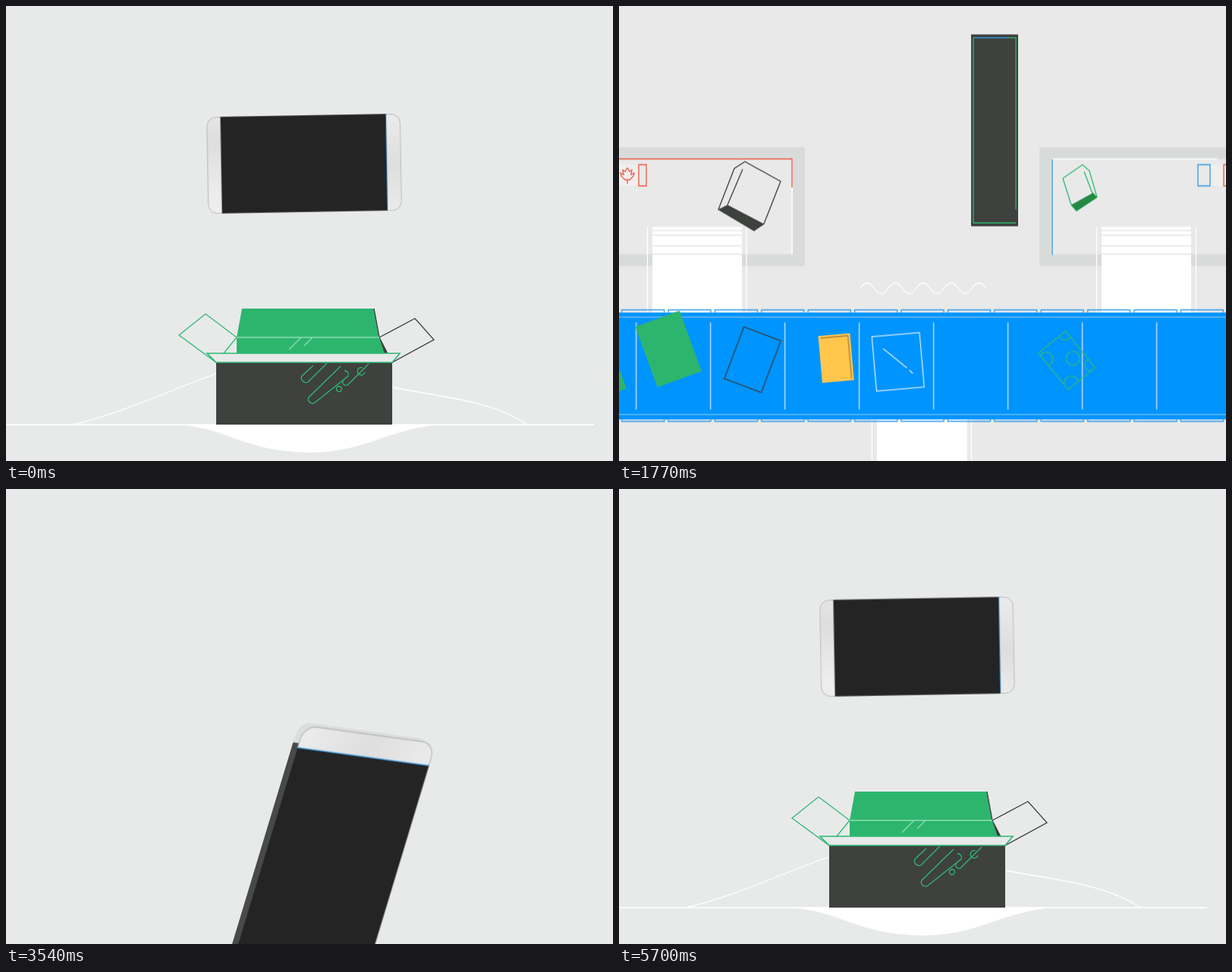
An HTML page that plays this animation: 800 px wide and 600 px high, repeating every 5730 ms.

```html
<!DOCTYPE html>
<html lang="en">
<head>
<meta charset="utf-8">
<title>Phone delivery</title>
<style>
html, body { margin: 0; width: 100%; height: 100%; overflow: hidden; background: #e8eaea; }
svg { display: block; width: 100%; height: 100%; }
.line { fill: none; stroke-width: 1.3; }
.white { stroke: #fff; }
.green { stroke: #2fb873; }
.dark { stroke: #3b3d3c; }
.blue { stroke: #2e9bea; }
.red { stroke: #f0563d; }
.leaf { fill: #2db56d; }
.coal { fill: #3e413e; }
.skin { fill: #ff9a7d; }
.finger { fill: #ffa283; }
.wall { fill: none; stroke: #d8dbda; stroke-width: 15.5; }
</style>
</head>
<body>
<svg viewBox="0 0 800 600" preserveAspectRatio="none">
  <defs>
    <linearGradient id="metal" x2="1" y2=".3">
      <stop stop-color="#ececec"/><stop offset=".5" stop-color="#dedede"/><stop offset="1" stop-color="#ededed"/>
    </linearGradient>
    <pattern id="grille" width="3" height="3" patternUnits="userSpaceOnUse">
      <rect width="2.1" height="2.1" fill="#777"/>
    </pattern>
    <clipPath id="screen"><path d="M283 132H485V468H283Z"/></clipPath>
  </defs>

  <g id="conveyor">
    <path class="wall" d="M-20 23.7H237V165H-20M820 23.7H562V165H820M265.5 441.5H532.5V582H265.5Z"/>
    <path class="line red" d="M0 31.5H228V69"/>
    <path class="line white" d="M228 69V157M571 31.5H788M274 450V490"/>
    <path class="line blue" d="M571 32V158"/>
    <path class="line green" d="M274 490V564M274 575H523.5V449" stroke-width="1.6"/>

    <path fill="#fff" d="M44 121H162V236H44ZM636 121H754V236H636ZM340 373H459V486H340Z"/>
    <path class="line white" d="M37.5 121V234M168 121V234M629.5 121V234M760.5 121V234M333.5 375V485M464.5 375V485"/>
    <path class="line" stroke="#e8e6e6" d="M44 126H162M44 132H162M44 146H162M44 157H162M636 126H754M636 132H754M636 146H754M636 157H754M340 449H459M340 461H459M340 475H459M340 481H459"/>
    <path class="line white" id="waves"/>

    <path fill="#f1eeee" d="M0 39H25V67H0ZM779 39H797V67H779Z"/>
    <path class="line red" d="M26 39H36V67H26ZM11 43L14 48L17 46L16 52L20 50L19 54L14 59H11V64M11 43L8 48L5 46L6 52L2 50L3 54L8 59H11M797 39H810V67H797Z"/>
    <path class="line blue" d="M763 39H779V67H763ZM284 536.5H334V564H284Z"/>
    <path class="line red" d="M284 547H304V537M313 537V547H334M334 554H313V564M304 564V554H284M285 538L302 547M332 538L315 547M285 563L302 554M332 563L315 554"/>

    <path class="line dark" d="M131 98L152 44L166 35L213 61L191 117L178 126ZM143 92L163 45"/>
    <path class="coal" d="M131 98L143 92L191 117L178 126Z"/>
    <path class="line green" d="M585 57L611 39L620 47L630 82L603 100L596 92ZM613 48L624 77"/>
    <path fill="#238a42" d="M596 92L625 76L630 82L603 100Z"/>
    <path class="leaf" d="M438 502L480 478L499 535L457 559Z"/>
    <path class="line green" d="M480 478L494 487L510 535"/>
    <path class="line dark" d="M489 504L499 535L511 543L469 569L457 559L499 535"/>

    <rect y="234" width="800" height="141" fill="#0094ff"/>
    <path class="line" stroke="#6bbcf7" d="M0 240H800M0 368.5H800"/>
    <g id="belt">
      <path stroke="#b7dcf7" stroke-width="115" stroke-dasharray="1.5 96.5" d="M-497 304.5H1100"/>
      <path class="line blue" id="rollers"/>
    </g>

    <rect id="sheetA" class="leaf" x="-31" y="-42.5" width="62" height="85"/>
    <rect id="sheetB" class="leaf" x="-31" y="-42.5" width="62" height="85"/>
    <rect id="card" class="line dark" x="-26" y="-36.5" width="52" height="73"/>
    <g id="note">
      <rect fill="#ffc64b" x="-21" y="-31" width="42" height="62"/>
      <path class="line" stroke="#a8803a" d="M-18 -28H18V29"/>
    </g>
    <g id="photo">
      <rect class="line" stroke="#d4eafa" x="-31.5" y="-36" width="63" height="72"/>
      <path class="line" stroke="#d4eafa" d="M-18 -19L11 9M14 12L18 17"/>
    </g>
    <rect id="frame" class="line green" x="-24" y="-32.5" width="48" height="65"/>
    <g id="bill" class="line green">
      <rect x="-31" y="-23" width="62" height="46"/>
      <circle cx="3" cy="-8" r="9"/>
      <path d="M-31 -11A11 11 0 0 0 -20 -23M31 6A9 9 0 0 0 23 23M-27 23A9 9 0 1 1 -10 23M17 -23A8 8 0 0 0 31 -16"/>
    </g>
    <g id="parcel">
      <rect class="coal" x="-31" y="-42.5" width="62" height="85"/>
      <path class="line green" vector-effect="non-scaling-stroke" d="M16 -41H28V35M28 41H-28V-41"/>
      <path class="line blue" vector-effect="non-scaling-stroke" d="M-28 -41H16"/>
    </g>
  </g>

  <g class="crate">
    <path class="line white" d="M0 552H775"/>
    <path class="line white" id="hillL"/>
    <path class="line white" id="hillR"/>
    <path fill="#fff" id="pool"/>
    <path class="line green" id="flapL"/>
    <path class="line dark" id="flapR"/>
    <path class="coal" d="M492 437L509 470H485Z"/>
    <path class="leaf" d="M304 437H492L500 462H304Z"/>
    <path class="leaf" id="flapB"/>
    <path class="line dark" id="edgeB"/>
    <path class="line" id="hinge" stroke="#8fdcb2" d="M304 437H492M373 453L389 437M393 448L404 437"/>
  </g>
  <g id="bubbles">
    <circle id="ringA" class="line white" r="7"/>
    <circle id="dot" fill="#fff" r="5"/>
    <circle id="ringB" class="line white" r="11"/>
  </g>

  <g class="hand">
    <path class="skin" d="M197 527L57 783H200L362 597C385 580 405 560 437 527Z"/>
    <path class="finger" d="M488 196C505 183 520 182 525 194C528 206 510 230 488 252Z"/>
    <path class="line" stroke="#d9684c" d="M525 194C528 206 510 230 494 247"/>
  </g>

  <g id="phone"><g transform="translate(-389 -313.5)">
    <g id="side">
      <rect x="283" y="101" width="212" height="425" rx="20" fill="#dcdedd"/>
      <path fill="#484a49" d="M283 130H320V498H283Z"/>
    </g>
    <rect x="283.5" y="101.5" width="211" height="424" rx="20" fill="url(#metal)" stroke="#b4b6b6" stroke-width="1.4"/>
    <path fill="#242424" d="M283 132H495V496H283Z"/>
    <path class="line blue" stroke-width="2" d="M283 132H495"/>
    <g id="face">
      <path fill="#343636" d="M485 132H495V496H485Z"/>
      <g clip-path="url(#screen)">
        <rect id="glow" x="283" y="132" width="202" height="336" fill="#55b8ff"/>
        <path id="tide" fill="#0094ff" d="M283 279C370 294 365 235 388 205C405 165 440 175 450 167C470 160 482 150 485 132V960H283Z"/>
      </g>
      <g id="badge"><circle class="leaf" r="49"/></g>
      <path fill="#fff" fill-opacity=".3" d="M290 132H425L387 332L362 468H290Z"/>
      <path fill="#fff" fill-opacity=".14" d="M290 468H362L353 496H290Z"/>
      <path fill="#31689a" fill-opacity=".75" d="M283 132H290V496H283Z"/>
      <path class="line" id="check" stroke="#d6eee8" style="stroke-width:2.2" pathLength="100" stroke-dasharray="100" d="M337 303L387 333L418 222"/>
      <path fill="url(#grille)" d="M327 117H447V126H327ZM329 503H449V512H329Z"/>
      <path fill="none" stroke="#777" stroke-width="1.3" d="M337 475L331 480L337 485M440 478L443.500 475L447 478V483H440Z"/>
      <g fill="#262626"><circle cx="310" cy="124" r="2.600"/><circle cx="317" cy="124" r="2.600"/><circle cx="459" cy="120" r="6"/></g>
    </g>
  </g></g>

  <g class="hand">
    <path class="skin" d="M170 577L197 527C190 450 200 390 219 354C232 325 245 312 251 300L280 220C285 206 296 206 303 212C320 228 318 262 306 310C298 345 296 352 292 362C312 392 322 425 318 462C314 500 300 525 280 540L250 577Z"/>
    <path class="line" stroke="#d9684c" d="M219 354C232 325 245 312 251 300L280 220C285 206 296 206 303 212M292 362C312 392 322 425 318 462C314 500 300 525 280 540"/>
    <g id="fingers" class="finger">
      <path d="M482 280C480 262 495 242 514 242C530 243 536 258 531 275C525 295 510 315 495 330V302C488 300 483 292 482 280Z"/>
      <path d="M495 405C480 405 480 385 484 365C490 335 508 304 530 304C550 306 552 330 542 350C535 362 528 372 520 382Z"/>
      <path d="M464 466C465 445 490 410 505 395C520 378 535 372 547 377C562 385 565 400 558 415C545 440 500 475 476 476C468 476 464 472 464 466Z"/>
    </g>
  </g>
  <g fill="#fff">
    <path id="star" d="M0 -25Q3 -3 24 0Q3 3 0 25Q-3 3 -24 0Q-3 -3 0 -25Z"/>
    <circle id="spark" r="7"/>
    <path id="twinkle" class="line white" d="M0 -6Q1 -1 6 0Q1 1 0 6Q-1 1 -6 0Q-1 -1 0 -6Z"/>
  </g>

  <g class="crate">
    <path class="coal" d="M277 470H509V552H277Z"/>
    <path class="line green" d="M405 474L390 488A6 6 0 0 0 398 496L423 471M441 475L399 516A5.500 5.500 0 0 0 407 523L451 488A5 5 0 0 0 446 481M451 488L445 493A4 4 0 0 0 451 499L478 472M470 477A5 5 0 1 0 473 483"/>
    <circle class="line green" cx="439" cy="505" r="3.500"/>
    <path class="green" fill="#e8eaea" stroke-width="1.6" id="flapF"/>
  </g>
</svg>
<script>
const LOOP = 5730;
const OUT = 'cubic-bezier(.215,.61,.355,1)', IN = 'cubic-bezier(.55,.06,.68,.19)';
const SMOOTH = 'ease-in-out', HOLD = 'steps(1,end)';
const $ = id => document.getElementById(id);

// Frames are [ms, value, easing towards the next frame].
function play(el, frames, prop = 'transform') {
  const keys = frames.slice();
  if (keys[0][0] > 0) keys.unshift([0, keys[0][1], 'linear']);
  keys.push([LOOP, keys[keys.length - 1][1]]);
  el.animate(keys.map(([t, v, easing = 'linear']) => ({ offset: t / LOOP, [prop]: v, easing })),
    { duration: LOOP, iterations: Infinity });
}
const at = (x, y, r = 0, sx = 1, sy = sx, skew = 0) =>
  `translate(${x}px,${y}px) rotate(${r}deg) skewX(${skew}deg) scale(${sx},${sy})`;
const move = (id, frames) =>
  play($(id), frames.map(([t, pose, ease]) => [t, at(...pose), ease]));
const fade = (id, frames) => play($(id), frames, 'opacity');

$('rollers').setAttribute('d', Array.from({ length: 28 }, (_, i) => {
  const x = 48 + 61.4 * (i - 10);
  return `M${x} 234v-3.500h56v3.500M${x} 374.500v3h56v-3`;
}).join(''));
const ripple = (x, y, n) => `M${x} ${y}q9.200 -14 18.400 0` + 't18.400 0'.repeat(n - 1);
$('waves').setAttribute('d', ripple(318, 202, 9) + ripple(-65, 444, 4) + ripple(725, 478, 6));

// Packing crate
for (const el of document.querySelectorAll('.crate')) {
  el.style.transformOrigin = '394px 552px';
  play(el, [[0, at(0, 0)], [340, at(0, 0), SMOOTH], [1140, at(1, -82.5, .74), SMOOTH],
    [1230, at(1, -80, .6), IN], [1480, at(0, -680), HOLD], [5270, at(0, 240), OUT], [5700, at(0, 0)]]);
}
function morph(id, open, shut, from, to) {
  const a = `path("${open}")`, b = `path("${shut}")`;
  play($(id), [[0, a], [from, a, SMOOTH], [to, b, HOLD], [1600, a]], 'd');
}
morph('pool',
  'M213 552L574 552C530 554 490 574 460 581C420 592 375 590 340 582C290 570 270 552 213 552Z',
  'M142 552L600 552C540 592 500 608 470 608C400 608 350 573 290 573C230 577 190 575 142 552Z', 300, 1140);
morph('hillL', 'M88 552C150 538 220 505 277 485', 'M119 551C165 522 215 472 279 475', 300, 1140);
morph('hillR', 'M510 503C570 515 640 520 687 552', 'M511 490C590 484 620 520 665 552', 300, 1140);
morph('flapL', 'M304 437L263 406L228 434L277 470Z', 'M304 437L350 442L340 464L277 470Z', 330, 560);
morph('flapR', 'M492 437L539 412L564 440L509 470Z', 'M492 437L450 442L455 464L509 470Z', 330, 560);
morph('flapB', 'M304 437L311 399L485 399L492 437Z', 'M305 434L296 448L498 448L492 434Z', 400, 640);
morph('edgeB', 'M485 399L492 437', 'M492 434L498 446', 400, 640);
morph('flapF', 'M277 470L265 458L519 458L509 470Z', 'M277 470L296 447L498 447L509 470Z', 400, 640);
fade('hinge', [[0, 1], [380, 1], [500, 0, HOLD], [1600, 1]]);

function bubble(id, x, y, start) {
  move(id, [[start, [x, y + 45, 0, 0], OUT], [1140, [x, y, 0, 1]], [1300, [x, y - 14, 0, 1], IN],
    [1480, [x, y - 480, 0, 1], HOLD], [1600, [x, y + 45, 0, 0]]]);
}
bubble('ringA', 475, 192, 720);
bubble('dot', 406, 224, 680);
bubble('ringB', 696, 422, 800);

// Sorting hall
move('conveyor', [[0, [0, 620], HOLD], [1416, [0, 600], OUT], [2496, [0, 0]], [3210, [0, 0], IN], [3450, [0, 620]]]);
const SPEED = .155;
const beltX = t => SPEED * (t - 2850);
move('belt', [[1400, [beltX(1400), 0]], [3450, [beltX(3450), 0]]]);

// Rides the belt through (x, y) at time t, then optionally leaves along further frames.
function ride(id, t, x, y, r, leave = 3450, ...rest) {
  const pose = time => [x + SPEED * (time - t), y, r];
  move(id, [[1400, pose(1400)], [leave, pose(leave), SMOOTH], ...rest]);
}
ride('sheetA', 1770, 65, 282, -20, 1990, [2330, [106, 175, -68], OUT], [2650, [79, 87, -136]]);
ride('sheetB', 1770, -34, 305, -20, 2600, [2850, [107, 180, -68], OUT], [3200, [116, 92, -120]]);
ride('note', 1770, 286, 294, -5, 2420, [2800, [377, 531, -81]]);
ride('photo', 2850, 535, 299, -5);
ride('frame', 2850, 25, 278, -5);
ride('bill', 1770, 590, 297, 51, 2380, [2800, [724, 96, 0]]);
// The card slips a little on the belt.
move('card', [[1400, [123, 296, 20]], [3450, [416, 297, 24]]]);
move('parcel', [[1400, [495, -800, 0, 1, 3], HOLD], [1560, [495, -590, 0, 1, 3]], [1770, [495, -10, 0, 1, 3]],
  [1850, [500, 285, 0, 1, 1.1], OUT], [1990, [522, 280, -16]], [2850, [655, 260, -21]],
  [3010, [680, 245, -24], SMOOTH], [3300, [692, 105, -70]]]);

// Phone
const packed = [393, 208, 89, .6];
move('phone', [[0, packed], [40, packed, IN], [340, [393, 504, 90, .42], HOLD],
  [3440, [434, 830, 12, .81, .99, -10], OUT], [3540, [418.3, 530, 7.9, .825, .991, -9.1], OUT],
  [3840, [389, 238, -3, 1]], [3880, [389, 238, -3, 1], SMOOTH], [4130, [389, 326, 1, 1], SMOOTH],
  [4350, [389, 313.5]], [5090, [389, 313.5], SMOOTH], [5660, packed]]);
fade('phone', [[0, 1, HOLD], [342, 0, HOLD], [3440, 1]]);
move('side', [[0, [0, 0], HOLD], [3440, [-9, -4]], [3560, [-9, -4], SMOOTH], [3850, [0, 0]]]);
fade('face', [[4380, 0], [4460, 1], [5100, 1], [5260, 0]]);
move('glow', [[4400, [0, 340], OUT], [4640, [0, 0]]]);
move('tide', [[4560, [0, 340], SMOOTH], [4890, [0, 0]], [5010, [0, -160]]]);
move('badge', [[4560, [387, 312, 0, 0], OUT], [4700, [387, 312, 0, 1.12], SMOOTH], [4800, [387, 312]]]);
play($('check'), [[0, 100], [4700, 100, OUT], [4880, 0]], 'strokeDashoffset');
fade('check', [[0, 0, HOLD], [4700, 1]]);

// Hand
for (const el of document.querySelectorAll('.hand'))
  play(el, [[0, at(0, 620), HOLD], [3860, at(0, 520), OUT], [4190, at(0, -12), SMOOTH], [4370, at(0, 0)],
    [5080, at(0, 0), IN], [5390, at(0, 520)]]);
move('fingers', [[3980, [95, 0], OUT], [4290, [0, 0]], [5070, [0, 0], SMOOTH], [5250, [95, 0]]]);

function glint(id, x, y, start) {
  move(id, [[start, [x, y, -30, 0], OUT], [4890, [x, y]], [4920, [x, y], IN], [5040, [x, y, 30, 0]]]);
}
glint('star', 468, 130, 4740);
glint('spark', 455, 153, 4780);
glint('twinkle', 486, 151, 4800);

document.body.animate([
  { offset: 0, backgroundColor: '#e8eaea', easing: HOLD },
  { offset: 1400 / LOOP, backgroundColor: '#e9e9e9', easing: HOLD },
  { offset: 3450 / LOOP, backgroundColor: '#e8eaea' },
  { offset: 1, backgroundColor: '#e8eaea' }
], { duration: LOOP, iterations: Infinity });
</script>
</body>
</html>
```
